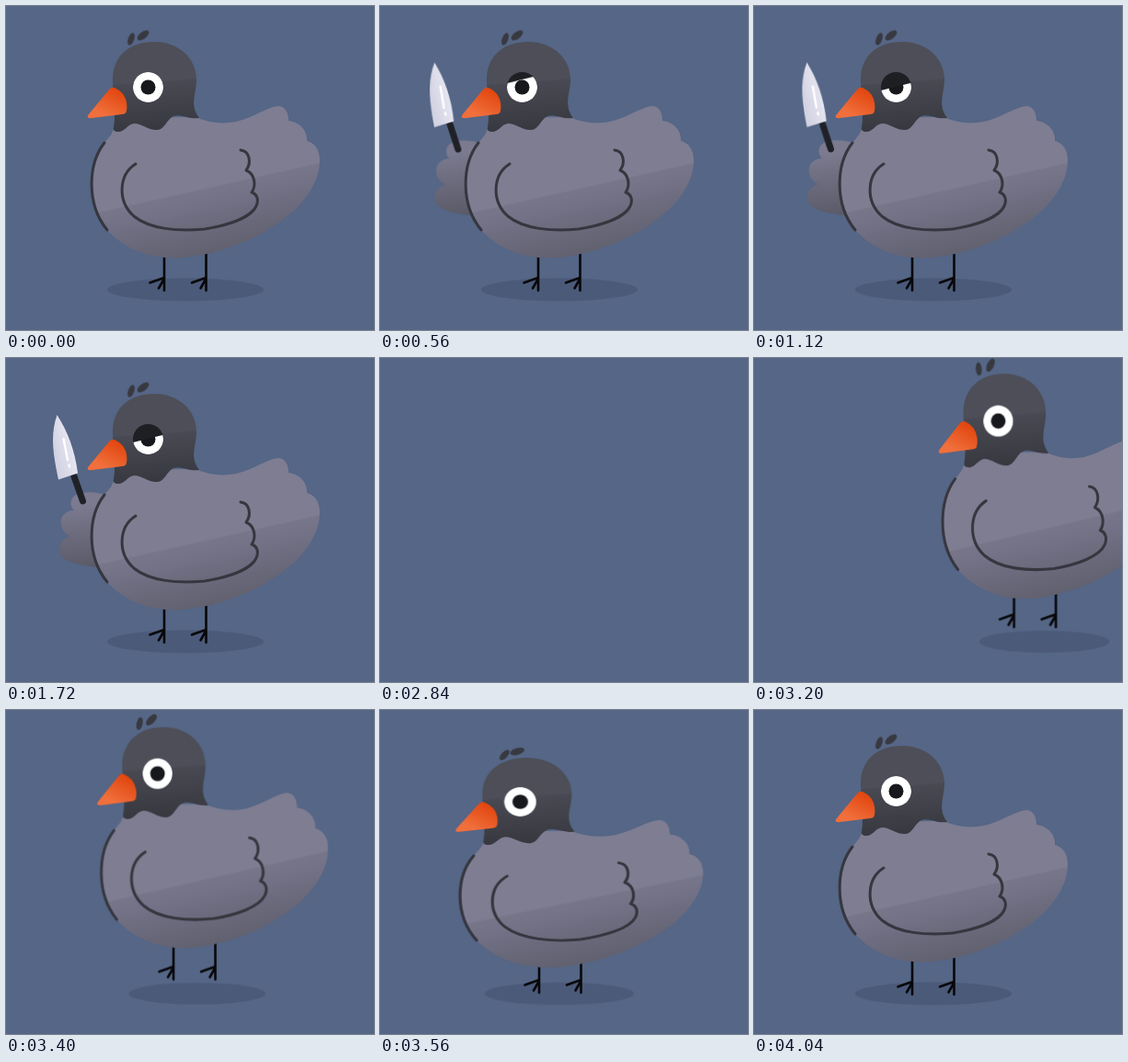
Write an HTML page that moves like this. It is 400 by 353 pixels and loops after 4.84 s.

```html
<!DOCTYPE html>
<html lang="en">
<head>
<meta charset="utf-8">
<title>Pigeon</title>
<style>
  html, body { margin: 0; width: 100%; height: 100%; overflow: hidden; background: #556686; }
  svg { display: block; width: 100%; height: 100%; }
  .line { fill: none; stroke: #36363f; stroke-width: 3; stroke-linecap: round; stroke-linejoin: round; }
  .legs { fill: none; stroke: #08080a; stroke-width: 2.6; stroke-linecap: round; }

  .bird, .hop, .body, .shadow, .arm, .knife, .lid, .tuft, .eye {
    animation: 4.84s linear infinite;
  }
  .bird { animation-name: enter; }
  .hop { animation-name: hop; }
  .body { animation-name: squash; transform-origin: 179px 310px; }
  .shadow { animation-name: shade; transform-origin: 195px 309px; }
  .arm { animation-name: reach; }
  .knife { animation-name: swing; transform-origin: 84px 157px; }
  .lid { animation-name: glare; }
  .tuft { animation-name: sway; transform-box: fill-box; transform-origin: center; }
  .eye { animation-name: settle; transform-origin: 154.5px 88.5px; }

  /* Scowl and knife */
  @keyframes reach {
    0%, 4.1% { transform: translate(72px, 8px); animation-timing-function: cubic-bezier(.35, 0, .4, 1); }
    13.2% { transform: translate(-1px, 0); animation-timing-function: ease-in-out; }
    19% { transform: translate(0, -1.5px); animation-timing-function: ease-in-out; }
    23.14%, 58.66% { transform: none; }
    58.67%, 100% { transform: translate(72px, 8px); }
  }
  @keyframes swing {
    0%, 4.1% { transform: rotate(14deg); animation-timing-function: ease-in-out; }
    15.7% { transform: rotate(-3deg); animation-timing-function: ease-in-out; }
    20.25% { transform: rotate(2.8deg); animation-timing-function: ease-in-out; }
    26.45% { transform: rotate(-.8deg); animation-timing-function: ease-in-out; }
    31% { transform: rotate(.4deg); animation-timing-function: ease-in-out; }
    35.54%, 58.66% { transform: none; }
    58.67%, 100% { transform: rotate(14deg); }
  }
  @keyframes glare {
    0%, 4.1% { transform: translateY(-24px); animation-timing-function: ease-in-out; }
    16.5%, 58.66% { transform: none; }
    58.67%, 100% { transform: translateY(-24px); }
  }

  /* Exit by hard cut, then hop back in */
  @keyframes enter {
    0%, 58.66% { transform: none; }
    58.67%, 60.74% { transform: translateX(344px); animation-timing-function: cubic-bezier(.333, .525, .667, 1); }
    71.9%, 100% { transform: none; }
  }
  @keyframes hop {
    0%, 58.66% { transform: none; }
    58.67%, 60.74% { transform: translateY(-24px); animation-timing-function: cubic-bezier(.333, 0, .667, .333); }
    64.46% { transform: none; animation-timing-function: cubic-bezier(.333, .667, .667, 1); }
    68.18% { transform: translateY(-24px); animation-timing-function: cubic-bezier(.333, 0, .667, .333); }
    71.9% { transform: none; }
    73.55% { transform: translate(1px, -2px); }
    75.21%, 100% { transform: none; }
  }
  @keyframes squash {
    0%, 60.74% { transform: none; }
    64.46% { transform: translateY(5px) scale(1.03, .98); }
    66.12% { transform: translateY(6px) scale(.985, 1.041); animation-timing-function: ease-in-out; }
    69.42% { transform: translateY(2px) scale(.99, 1.03); animation-timing-function: ease-in-out; }
    71.9% { transform: translateY(3px) scale(1.01, 1); animation-timing-function: ease-out; }
    73.75% { transform: translate(-1.5px, 7px) scale(1.067, .97); animation-timing-function: ease-in-out; }
    76.86% { transform: scale(.988, 1.012); animation-timing-function: ease-in-out; }
    79.34% { transform: scale(1.005, .997); }
    80.99%, 100% { transform: none; }
  }
  @keyframes shade {
    0%, 58.66% { transform: none; }
    58.67%, 60.74% { transform: scale(.76, .9); }
    64.46% { transform: none; }
    66.12% { transform: translateX(10px) scale(.83, .95); }
    68.18% { transform: translateX(6px) scale(.76, .9); }
    71.9% { transform: scale(.96); }
    73.55% { transform: scale(.955, .97); }
    76.86%, 100% { transform: none; }
  }
  @keyframes sway {
    0%, 60.74% { transform: none; }
    66.12% { transform: translate(-3px, -2px) rotate(-25deg); }
    69.42% { transform: translate(-2px, -1px) rotate(-14deg); }
    73.55% { transform: translate(2.5px, 0) rotate(19deg); animation-timing-function: ease-in-out; }
    77% { transform: translate(-1px, 0) rotate(-8deg); animation-timing-function: ease-in-out; }
    80.99%, 100% { transform: none; }
  }
  @keyframes settle {
    0%, 73.55% { transform: none; }
    80.99% { transform: scale(1.02); }
    83.4%, 100% { transform: none; }
  }
</style>
</head>
<body>
<svg viewBox="0 0 400 353">
  <defs>
    <linearGradient id="plumage" gradientUnits="userSpaceOnUse" x1="200" y1="178" x2="222" y2="276">
      <stop offset=".23" stop-color="#7e7d92"/>
      <stop offset=".25" stop-color="#777689"/>
      <stop offset=".35" stop-color="#747388"/>
      <stop offset="1" stop-color="#605f6d"/>
    </linearGradient>
    <linearGradient id="hood" gradientUnits="userSpaceOnUse" x1="158" y1="70" x2="163" y2="136">
      <stop offset=".18" stop-color="#4d4e57"/>
      <stop offset=".21" stop-color="#484952"/>
      <stop offset="1" stop-color="#37383f"/>
    </linearGradient>
    <linearGradient id="bill" gradientUnits="userSpaceOnUse" x1="122" y1="92" x2="108" y2="119">
      <stop offset="0" stop-color="#e2460f"/>
      <stop offset="1" stop-color="#f06f3c"/>
    </linearGradient>
    <linearGradient id="wing" gradientUnits="userSpaceOnUse" x1="85" y1="160" x2="92" y2="228">
      <stop offset="0" stop-color="#7b7a8f"/>
      <stop offset="1" stop-color="#5a5a68"/>
    </linearGradient>
    <linearGradient id="steel" gradientUnits="userSpaceOnUse" x1="52" y1="98" x2="74" y2="92">
      <stop offset="0" stop-color="#d3d3e3"/>
      <stop offset="1" stop-color="#e9e9f4"/>
    </linearGradient>
    <clipPath id="eyeball"><circle cx="154.5" cy="88.5" r="16.6"/></clipPath>
    <path id="leg" d="M172 268V310M172 296L156.500 301.500M172 297L166 307.500"/>
  </defs>

  <g class="bird">
    <ellipse class="shadow" cx="195" cy="309" rx="85" ry="12.5" fill="#4b5a79"/>
    <g class="hop">
      <g class="legs">
        <use href="#leg"/>
        <use href="#leg" x="45.5"/>
      </g>
      <g class="body">
        <g class="arm">
          <path fill="url(#wing)" d="M115 150C100 147 86 144 76 149C69 153 69 161 74 166C64 166 58 174 60 182C61 189 66 193 71 194C62 196 56 204 58 212C62 223 84 228 115 229Z"/>
          <g class="knife">
            <path d="M74 129L83.500 156" stroke="#202127" stroke-width="7" stroke-linecap="round"/>
            <path fill="url(#steel)" d="M55.500 62C48 83 51 105 57 132.500L78 125.500C75 101 67 80 55.500 62Z"/>
            <path d="M62.500 88L67 111M68.500 116.500L69 118.500" stroke="#fff" stroke-width="2.400" stroke-linecap="round"/>
          </g>
        </g>

        <path fill="url(#plumage)" d="M119 122C118 138 113 142 107 149C89 172 86 216 110 244C128 264 154 274 180 274.500C222 275 280 254 314 222C330 206 341 188 341 168C341 156 335 149 327 147C328 135 318 126 307 125C307 114 302 109 296 109C284 110 270 121 250 126C234 129 220 127 206 121Z"/>
        <path class="line" d="M107 149C89 172 87 216 110 244"/>
        <path class="line" d="M141 172C122 184 121 213 139 229C156 243 187 246 216 243C240 239 266 231 272 218C275 211 273 205 267 203C272 196 271 183 261 179C267 171 265 158 255 157"/>

        <g fill="#383940">
          <g class="tuft"><ellipse cx="136" cy="36" rx="3.300" ry="7" transform="rotate(20 136 36)"/></g>
          <g class="tuft"><ellipse cx="149" cy="32" rx="3.800" ry="7.500" transform="rotate(52 149 32)"/></g>
        </g>
        <path fill="url(#hood)" d="M117 132C120 116 116 100 116 80C116 54 135 39 161 39C188 39 207 57 207 80C207 96 199 107 210 122C199 124 190 117 182 120C174 124 173 134 165 135C155 136 148 128 139 128C132 129 129 137 122 137C118 137 116 135 117 132Z"/>
        <path fill="url(#bill)" d="M89.500 118.500L112.500 90.500Q115 88 118 89Q129 94 131 105Q132 112 130.500 116Q129 118 126 118L92 122.300Q87 122.300 89.500 118.500Z"/>

        <g class="eye">
          <g clip-path="url(#eyeball)">
            <circle cx="154.5" cy="88.5" r="16.500" fill="#fff"/>
            <circle cx="154.5" cy="88.500" r="8" fill="#17181b"/>
            <path class="lid" fill="#1e1f23" d="M130 94L180 81.500V40H130Z"/>
          </g>
        </g>
      </g>
    </g>
  </g>
</svg>
</body>
</html>
```
